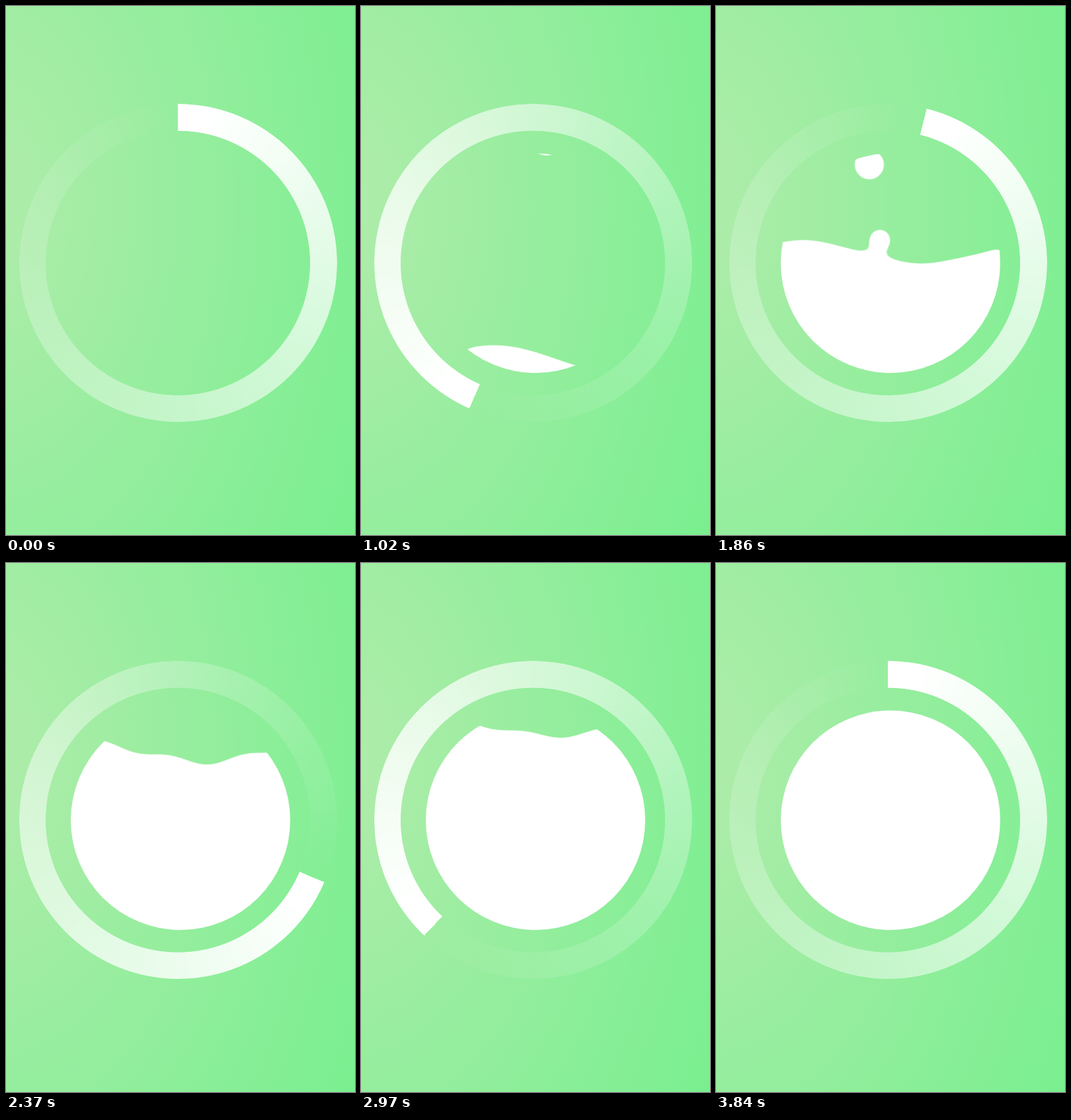
An HTML page for the animation above (3.87 s loop, 528 by 800 pixels).

```html
<!DOCTYPE html>
<html lang="en">
<head>
<meta charset="utf-8">
<title>Filling loader</title>
<style>
  html, body { margin: 0; width: 100%; height: 100%; overflow: hidden; }
  body {
    position: relative;
    background: radial-gradient(640px 1000px at -30px 300px, #b0ecab, #7aef90);
  }
  #ring {
    position: absolute; left: 20px; top: 148px; width: 481px; height: 481px;
    border-radius: 50%;
    --hole: radial-gradient(circle at 240px 240.7px, #0000 199.6px, #000 200.4px);
    -webkit-mask: var(--hole); mask: var(--hole);
    background: conic-gradient(from var(--turn), #fff 10deg, rgba(255,255,255,.2) 270deg, rgba(255,255,255,0) 360deg);
  }
  svg { position: absolute; left: 0; top: 0; }
</style>
</head>
<body>
<div id="ring"></div>
<svg width="528" height="800" viewBox="0 0 528 800">
  <defs>
    <clipPath id="bowl"><circle cx="264" cy="389" r="166"/></clipPath>
    <filter id="goo" filterUnits="userSpaceOnUse" x="0" y="100" width="528" height="600" color-interpolation-filters="sRGB">
      <feGaussianBlur stdDeviation="11"/>
      <feColorMatrix values="0 0 0 0 1  0 0 0 0 1  0 0 0 0 1  0 0 0 18 -7"/>
    </filter>
  </defs>
  <g clip-path="url(#bowl)">
    <g id="fluid" filter="url(#goo)" fill="#fff">
      <path id="pool"/>
    </g>
  </g>
</svg>
<script>
const LOOP = 3870, STEP = 30;
const ring = document.getElementById('ring');
const fluid = document.getElementById('fluid');
const pool = document.getElementById('pool');

// Linear between [time, value] keys
function mix(keys, t) {
  const i = keys.findIndex(k => t < k[0]);
  if (i < 0) return keys[keys.length - 1][1];
  if (i === 0) return keys[0][1];
  const [t0, a] = keys[i - 1], [t1, b] = keys[i];
  return a + (b - a) * (t - t0) / (t1 - t0);
}

const turn = [[0, 0], [600, 123.7], [1410, 278], [1860, 374], [2370, 473.1], [2970, 583.3], [3840, 720]];
const level = [[820, 575], [1410, 453], [1860, 372], [2370, 286], [2970, 249], [3840, 195]];

// Each drop passes (x, y) at time t and falls at a steady speed
const drops = [480, 1860, 2730, 3330].flatMap(t => [
  { t, x: 248, y: 354, vx: 0, vy: 0.49, r: 17 },
  { t, x: 232, y: 240, vx: -0.1, vy: 0.767, r: 22.5 }
]);
drops.push(
  { t: 1410, x: 289, y: 370, vx: 0.02, vy: 0.45, r: 31 },
  { t: 1410, x: 251, y: 280, vx: 0.03, vy: 0.45, r: 45.5 }
);
for (const drop of drops) {
  drop.el = document.createElementNS('http://www.w3.org/2000/svg', 'circle');
  drop.el.setAttribute('r', drop.r);
  fluid.appendChild(drop.el);
}

// One long swell drifting left, plus a short ripple from the absorbed drops
function poolPath(t) {
  const mean = mix(level, t) + 2;
  const trough = 290 + 50 * Math.exp((1410 - t) / 600);
  const swell = 19 - (t - 1410) / 250;
  const ripple = 6 * Math.exp(-(((t - 2600) / 550) ** 2));
  const wave = (x, middle, length) => Math.cos(2 * Math.PI * (x - middle) / length);
  const left = trough - 234, right = 436;
  let d = `M${left} 700`;
  for (let x = left; x < right + 4; x += 4) {
    d += `L${x} ${mean + swell * wave(x, trough, 370) + ripple * wave(x, 305, 110)}`;
  }
  return d + 'V700Z';
}

function draw(t) {
  ring.style.setProperty('--turn', mix(turn, t) + 'deg');
  pool.setAttribute('d', t < level[0][0] ? '' : poolPath(t));
  for (const { el, x, y, vx, vy, t: when } of drops) {
    el.setAttribute('cx', x + vx * (t - when));
    el.setAttribute('cy', y + vy * (t - when));
  }
}

const start = performance.now();
function tick() {
  const t = (performance.now() - start) % LOOP;
  draw(Math.floor(t / STEP) * STEP);
  requestAnimationFrame(tick);
}
draw(0);
requestAnimationFrame(tick);
</script>
</body>
</html>
```
